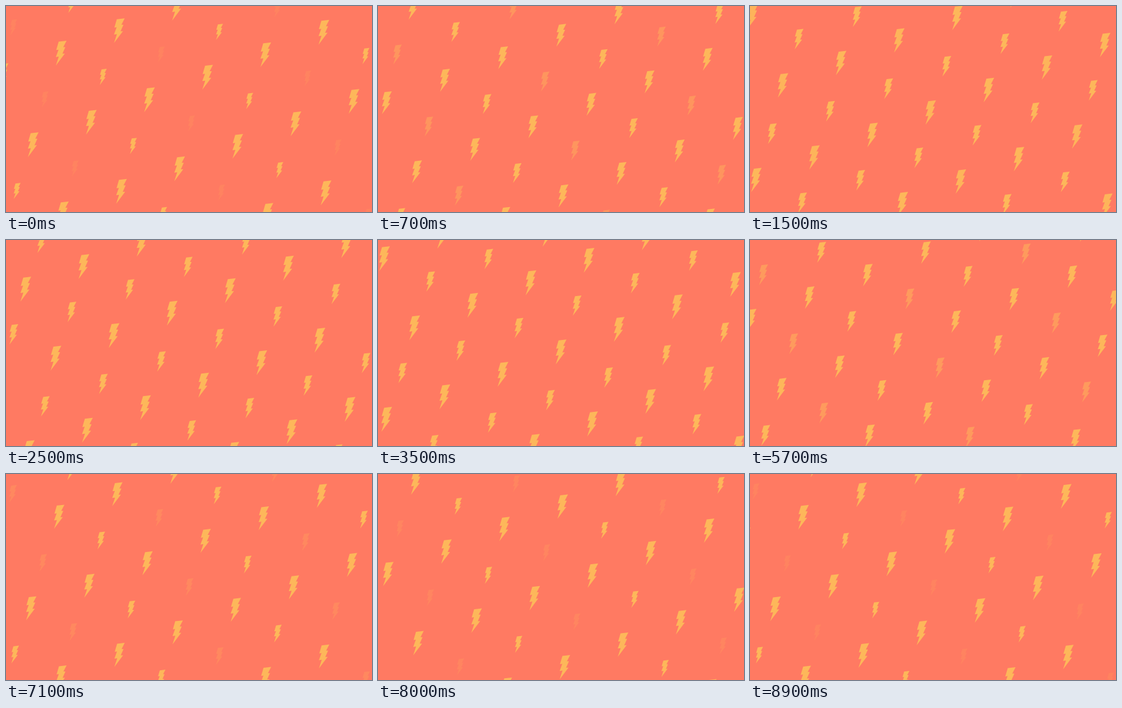
Animation of 600 by 338 pixels, one loop 9 s. Source, as an HTML page:

```html
<!DOCTYPE html>
<html lang="en">
<head>
<meta charset="utf-8">
<title>Lightning pattern</title>
<style>
  html, body { margin: 0; width: 100%; height: 100%; overflow: hidden; background: #ff7a62; }
  svg { display: block; width: 100%; height: 100%; }
</style>
</head>
<body>
<svg id="stage" viewBox="0 0 600 338" fill="#fdb75a"></svg>
<script>
const LOOP = 9000, STEP = 100;
const TRAVEL = { x: 249.3, y: 571.5 };   // distance covered in one loop
const COLUMN = { x: 95.3, y: -36.9 };    // from one column to the next
const ROW_GAP = 0.1983;                  // share of TRAVEL; five rows leave a small gap
const ROWS = 5, FIRST_COLUMN = -2, LAST_COLUMN = 5, MARGIN = 40;
const BOLT = 'M-4-18.8 9-20.3 3.6-9.8 7-9.8 2.2 1 6.2 .8-8.6 20.5-3.8 5.8-8.6 6.5-4.2-5.6-8-5Z';

// Size balance between the two sets: 0 = first set big, 1 = second set big.
const BALANCE = [
  [0, .02], [.4, .2], [.8, .52], [1.2, .86], [1.6, .98], [2.2, 1], [3.8, 1], [4.5, .97],
  [5.1, .78], [5.7, .54], [6.4, .33], [7.1, .2], [8, .11], [9, .05]
];

const stage = document.getElementById('stage');
const mix = (a, b, k) => a + (b - a) * k;
const mod = (a, n) => ((a % n) + n) % n;

function balanceAt(seconds) {
  const i = BALANCE.findIndex(key => key[0] > seconds);
  const [t0, v0] = BALANCE[i - 1], [t1, v1] = BALANCE[i];
  return mix(v0, v1, (seconds - t0) / (t1 - t0));
}

function addBolt(origin, row, column, second) {
  const node = document.createElementNS('http://www.w3.org/2000/svg', 'path');
  node.setAttribute('d', BOLT);
  stage.append(node);
  return {
    node, second,
    fades: second && column % 2 !== 0,
    x: origin.x + column * COLUMN.x + row * ROW_GAP * TRAVEL.x,
    y: origin.y + column * COLUMN.y + row * ROW_GAP * TRAVEL.y
  };
}

const bolts = [];
for (let row = 0; row < ROWS; row++) {
  for (let column = FIRST_COLUMN; column <= LAST_COLUMN; column++) {
    bolts.push(addBolt({ x: 90.3, y: 77.3 }, row, column, false));
    bolts.push(addBolt({ x: 159.3, y: 116.3 }, row, column, true));
  }
}

function draw(ms) {
  const progress = ms / LOOP;
  const balance = balanceAt(ms / 1000);
  const firstScale = mix(1, .82, balance);
  const secondScale = mix(.645, 1, balance);
  const faint = mix(.14, 1, balance ** 1.3);

  for (const bolt of bolts) {
    const rawY = bolt.y + progress * TRAVEL.y;
    const y = mod(rawY + MARGIN, TRAVEL.y) - MARGIN;
    const x = bolt.x + progress * TRAVEL.x + (y - rawY) / TRAVEL.y * TRAVEL.x;
    const scale = bolt.second ? secondScale : firstScale;
    bolt.node.setAttribute('transform',
      `translate(${x.toFixed(2)} ${y.toFixed(2)}) scale(${scale.toFixed(3)})`);
    if (bolt.fades) bolt.node.setAttribute('opacity', faint.toFixed(3));
  }
}

const start = performance.now();
function tick() {
  const elapsed = (performance.now() - start) % LOOP;
  draw(Math.floor(elapsed / STEP) * STEP);
  requestAnimationFrame(tick);
}
tick();
</script>
</body>
</html>
```
